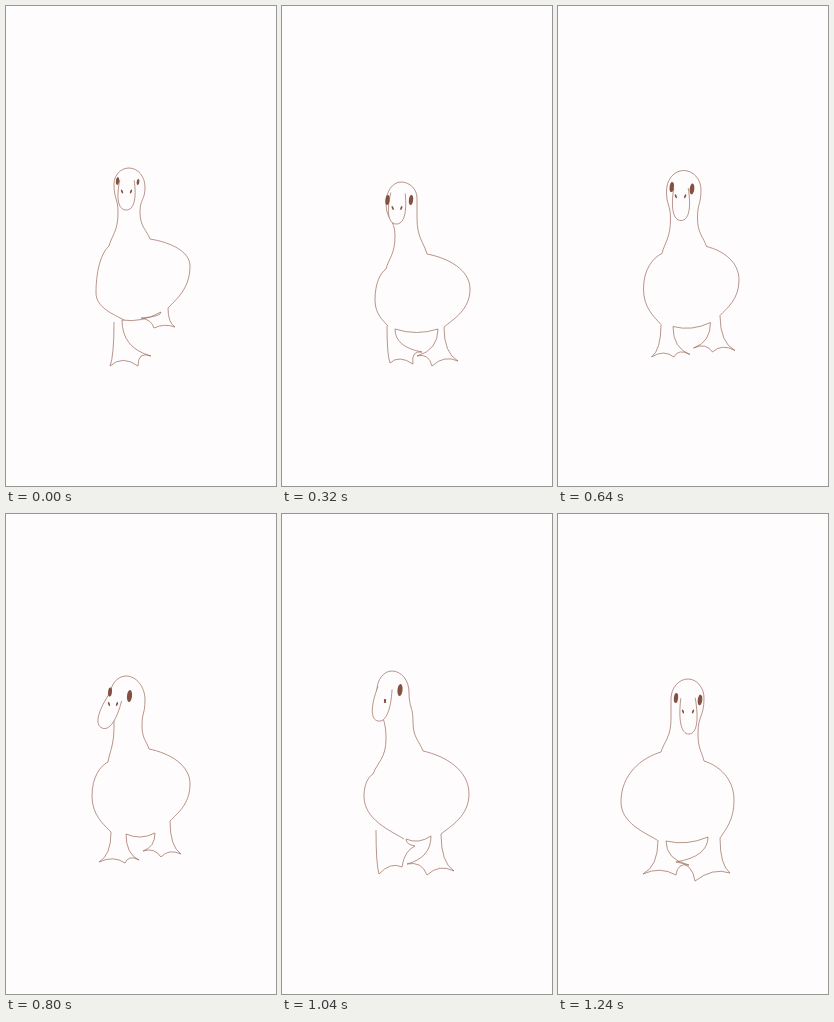
An HTML page that plays this animation: 270x480 px, repeating every 1280 ms.

```html
<!DOCTYPE html>
<html lang="en">
<head>
<meta charset="utf-8">
<title>Waddling duck</title>
<style>
  html, body { margin: 0; width: 100%; height: 100%; overflow: hidden; background: #fffcfd; }
  svg { display: block; width: 100%; height: 100%; }
  path { fill: none; stroke: #99695a; stroke-width: .7; stroke-linejoin: round; }
  .beak { fill: #fffcfd; }
  ellipse { fill: #84503f; }
</style>
</head>
<body>
<svg id="stage" viewBox="0 0 270 480"></svg>
<script>
const STEP = 40, LOOP = 1280, BEAK_WIDTH = 9;

// Joints of the duck at its key poses:
// head: shoulder, neck, temple, top, temple, neck, shoulder
// body: left bulge, left hip, right bulge
// feet: outer leg, three toes, inner leg
// beak: base, tip; eyes: x, y, size; nose: x, y, spread
const POSES = [
  { at: 0,
    head: [[103, 240], [112, 207], [108, 178], [123, 162], [139, 181], [134, 206], [144, 233]],
    body: [[90, 287], [118, 314], [184, 260]],
    footL: [[108, 316], [104, 360], [132, 360], [145, 350], [116, 314]],
    footR: [[155, 306], [135, 312], [148, 322], [169, 321], [162, 302]],
    beak: [[121, 174], [120, 204]], eyes: [[111.5, 175, 3.8], [132, 176, 3.1]], nose: [120.5, 185.5, 4.5] },
  { at: 160,
    head: [[118, 245], [130, 212], [125, 187], [138, 163], [154, 188], [151, 214], [160, 250]],
    body: [[83, 276], [128, 321], [181, 284]],
    footL: [[105, 311], [97, 331], [119, 335], [133, 331], [128, 321]],
    footR: [[149, 321], [132, 351], [150, 361], [177, 354], [162, 324]],
    beak: [[139, 180], [141, 217]], eyes: [[127.5, 186, 4.6], [148.5, 183, 4.6]], nose: [139, 193, 3.4] },
  { at: 320,
    head: [[104, 263], [113, 230], [104, 197], [119, 176], [135, 192], [135, 212], [145, 248]],
    body: [[93, 294], [106, 320], [188, 283]],
    footL: [[105, 320], [108, 357], [131, 358], [140, 346], [113, 323]],
    footR: [[156, 323], [135, 350], [150, 360], [176, 355], [162, 321]],
    beak: [[116, 187], [114, 218]], eyes: [[105.5, 194, 5], [129, 194, 5]], nose: [115, 202, 4.3] },
  { at: 480,
    head: [[106, 247], [117, 214], [113, 188], [131, 167], [147, 181], [143, 212], [154, 246]],
    body: [[85, 284], [100, 318], [178, 278]],
    footL: [[101, 319], [94, 354], [113, 353], [131, 351], [110, 321]],
    footR: [[156, 314], [134, 347], [154, 349], [179, 349], [160, 312]],
    beak: [[137, 180], [150, 215]], eyes: [[123.5, 184, 5.6], [144.5, 184, 5]], nose: [138, 190.5, 5.3] },
  { at: 800,
    head: [[102, 248], [108, 212], [104, 182], [120, 162], [139, 186], [136, 212], [143, 235]],
    body: [[86, 282], [105, 318], [184, 270]],
    footL: [[105, 318], [93, 348], [119, 349], [133, 346], [120, 320]],
    footR: [[149, 319], [137, 337], [155, 343], [175, 340], [164, 307]],
    beak: [[109, 184], [96, 214]], eyes: [[104, 178, 4.6], [123.5, 182, 6]], nose: [107, 190, 4] },
  { at: 1040,
    head: [[91, 260], [104, 225], [95, 176], [110, 157], [127, 178], [131, 208], [141, 237]],
    body: [[82, 282], [122, 325], [187, 280]],
    footL: [[94, 316], [97, 360], [120, 353], [133, 332], [124, 325]],
    footR: [[149, 322], [125, 350], [145, 361], [172, 357], [159, 320]],
    beak: [[103, 174], [96, 207]], eyes: [[97, 170, 0], [118, 176, 6]], nose: [103, 187, 0] },
  { at: 1240,
    head: [[103, 238], [113, 205], [113, 185], [130, 165], [146, 184], [140, 220], [146, 247]],
    body: [[63, 288], [99, 326], [176, 286]],
    footL: [[100, 326], [85, 360], [118, 361], [131, 351], [108, 327]],
    footR: [[150, 323], [118, 348], [137, 367], [172, 359], [162, 324]],
    beak: [[130, 184], [131, 220]], eyes: [[118, 184, 5], [142, 186, 5.4]], nose: [130, 197.5, 5] }
];

// Shares of the way (x, y) that a curve's handle reaches.
const UPRIGHT = [0, .55], LEVEL = [.55, 0], CHORD = [.33, .33], SHOULDER = [.5, .12], HIP = [.35, .2];

const stage = document.getElementById('stage');
function add(tag, cls = '') {
  const el = document.createElementNS('http://www.w3.org/2000/svg', tag);
  el.setAttribute('class', cls);
  return stage.appendChild(el);
}
const outline = add('path'), beak = add('path', 'beak');
const dots = Array.from({ length: 4 }, () => add('ellipse'));

function bend([x, y], [u, v], from, to) {
  const dx = u - x, dy = v - y;
  return `C${x + dx * from[0]},${y + dy * from[1]} ${u - dx * to[0]},${v - dy * to[1]} ${u},${v}`;
}
const mid = (a, b) => mix(a, b, .5);

function headPath([shoulderL, neckL, templeL, top, templeR, neckR, shoulderR]) {
  return 'M' + shoulderL + bend(shoulderL, neckL, CHORD, UPRIGHT) +
    bend(neckL, templeL, UPRIGHT, UPRIGHT) + bend(templeL, top, UPRIGHT, LEVEL) +
    bend(top, templeR, LEVEL, UPRIGHT) + bend(templeR, neckR, UPRIGHT, UPRIGHT) +
    bend(neckR, shoulderR, UPRIGHT, CHORD);
}

const sidePath = (shoulder, bulge, hip) =>
  'M' + shoulder + bend(shoulder, bulge, SHOULDER, UPRIGHT) + bend(bulge, hip, UPRIGHT, HIP);

function footPath([outer, a, b, c, inner]) {
  const ankle = mid(outer, inner);
  const web = (p, q) => `Q${mix(mid(p, q), ankle, .25)} ${q}`;
  const shin = (leg, toe) => [leg[0], leg[1] + (toe[1] - leg[1]) * .78];
  return `M${outer}Q${shin(outer, a)} ${a}` + web(a, b) + web(b, c) + `Q${shin(inner, c)} ${inner}`;
}

function bellyPath(from, to) {
  const [x, y] = mid(from, to);
  return `M${from}Q${x},${y + 7} ${to}`;
}

function beakPath([[x, y], [u, v]]) {
  const dx = u - x, dy = v - y, w = BEAK_WIDTH / Math.hypot(dx, dy);
  const at = (side, along) => [x + dx * along + dy * w * side, y + dy * along - dx * w * side];
  return `M${at(-.8, 0)}C${at(-1.15, .6)} ${at(-.9, 1)} ${at(0, 1)}` +
    `C${at(.9, 1)} ${at(1.15, .6)} ${at(.8, 0)}`;
}

function placeDot(el, x, y, rx, ry, tilt) {
  el.setAttribute('rx', rx);
  el.setAttribute('ry', ry);
  el.setAttribute('transform', `translate(${x} ${y}) rotate(${tilt})`);
}

// Blends numbers, nested lists and whole poses alike.
function mix(a, b, k) {
  if (typeof a === 'number') return a + (b - a) * k;
  if (Array.isArray(a)) return a.map((v, i) => mix(v, b[i], k));
  return Object.fromEntries(Object.keys(a).map(key => [key, mix(a[key], b[key], k)]));
}

function poseAt(t) {
  const next = Math.max(1, POSES.findIndex(pose => pose.at >= t));
  const from = POSES[next - 1], to = POSES[next];
  return mix(from, to, (1 - Math.cos(Math.PI * (t - from.at) / (to.at - from.at))) / 2);
}

function draw(time) {
  const pose = poseAt(Math.floor(time % LOOP / STEP) * STEP);
  const { head, body: [bulgeL, hipL, bulgeR], footL, footR, eyes, nose: [x, y, spread] } = pose;

  outline.setAttribute('d', headPath(head) +
    sidePath(head[0], bulgeL, hipL) + sidePath(head[6], bulgeR, footR[4]) +
    bellyPath(footL[4], footR[0]) + footPath(footL) + footPath(footR));
  beak.setAttribute('d', beakPath(pose.beak));

  eyes.forEach(([ex, ey, size], i) => placeDot(dots[i], ex, ey, size * .42, size, 6));
  [-1, 1].forEach((side, i) => placeDot(dots[i + 2], x + side * spread, y, .9, 2.2, side * 20));
}

const start = performance.now();
function tick() {
  draw(performance.now() - start);
  requestAnimationFrame(tick);
}
tick();
</script>
</body>
</html>
```
